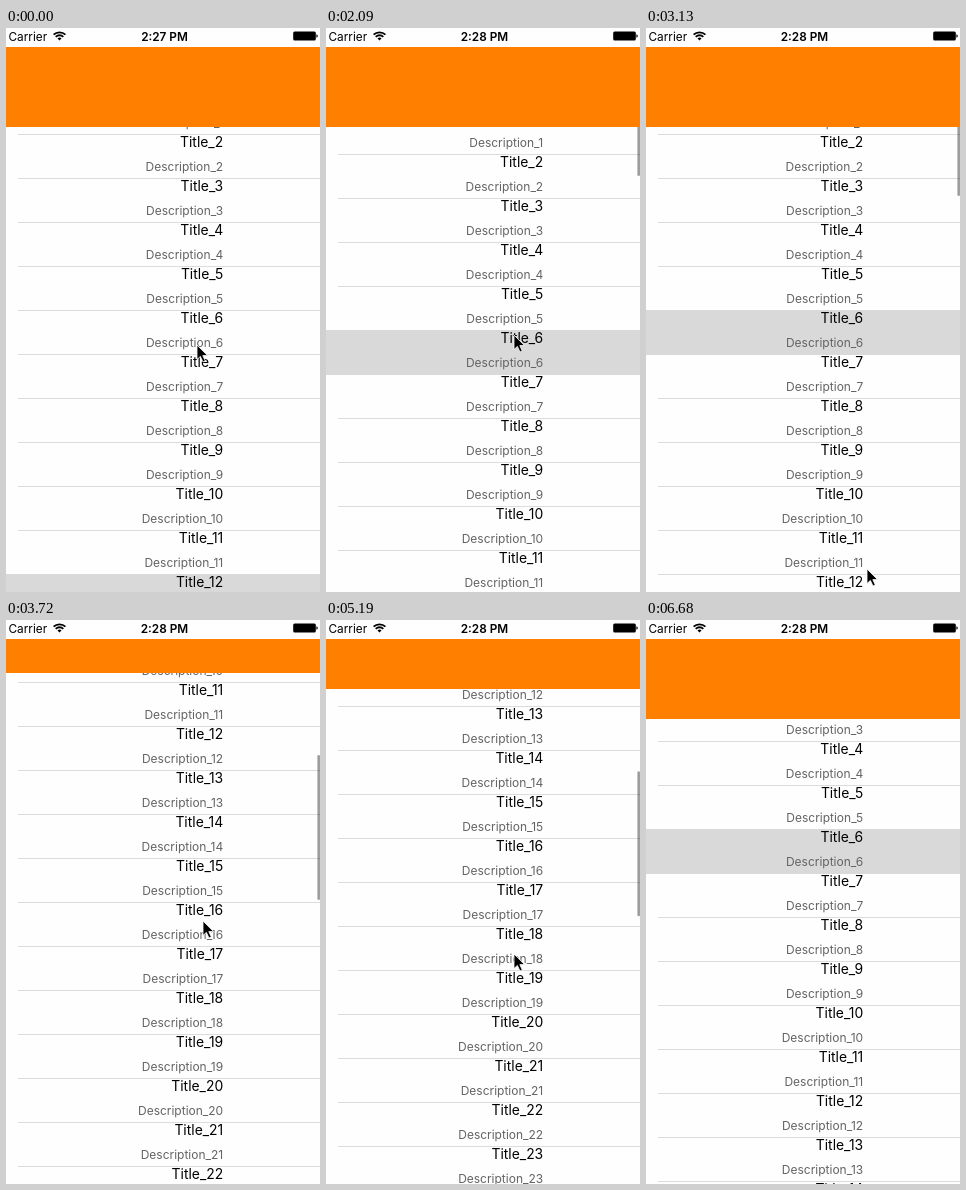
Write an HTML page that moves like this. It is 314 px wide and 564 px high and loops after 6820 ms.

```html
<!DOCTYPE html>
<html lang="en">
<head>
<meta charset="utf-8">
<title>List with collapsing header</title>
<style>
  html, body { margin: 0; width: 100%; height: 100%; overflow: hidden; background: #fff; }
  svg { display: block; width: 314px; height: 564px; font-family: Inter, Roboto, sans-serif; }
  .title { font-size: 13.9px; fill: #000; text-anchor: end; }
  .description { font-size: 12px; fill: #636363; text-anchor: end; }
  .status { font-size: 11.8px; }
</style>
</head>
<body>
<svg viewBox="0 0 314 564">
  <rect width="314" height="564" fill="#fefefe"/>
  <g id="rows"></g>
  <rect id="indicator" x="311.4" width="2.6" rx="1.3" fill="#000" opacity=".38"/>
  <rect width="314" height="21" fill="#fefefe"/>
  <rect id="header" y="19" width="314" fill="#ff8000"/>
  <g class="status">
    <text x="2.5" y="12.6">Carrier</text>
    <text id="clock" x="158.5" y="12.6" text-anchor="middle" font-weight="600"></text>
  </g>
  <g fill="none" stroke="#000" stroke-width="1.8">
    <path d="M47.6 6.7a8.4 8.4 0 0 1 11.8 0M49.7 8.8a5.4 5.4 0 0 1 7.6 0"/>
    <path d="M53.5 12.6l-2-2a2.8 2.8 0 0 1 4 0z" fill="#000" stroke="none"/>
  </g>
  <rect x="287.2" y="3.4" width="22.6" height="9.2" rx="1.5"/>
  <path d="M310.4 6.3q1.4.4 1.4 1.7t-1.4 1.7z"/>
  <path id="cursor" d="M0 0V14.5L3.4 11.4L6 17L8.3 16L5.8 10.6H10.5Z" stroke="#fff" stroke-width=".8"/>
</svg>
<script>
const LOOP = 6820, STEPS = 46, ROW = 44, REST = 18, FAR = -900;
const $ = id => document.getElementById(id);
const clamp = (v, lo, hi) => Math.min(hi, Math.max(lo, v));

const linear = u => u;
const easeIn = u => u * u;
const easeOut = u => 1 - (1 - u) ** 2;
const glide = u => 1 - (1 - u) ** 4;

// each move: start step, end step, destination, easing
const scrollMoves = [
  [21, 25, [-422], easeIn],
  [25, 29, [FAR], easeOut],
  [32, 35, [-486], easeIn],
  [35, 45, [-55], glide]
];
const cursorMoves = [
  [2, 4, [180, 354]],
  [4, 6, [168, 310]],
  [6, 8, [177, 249]],
  [9, 11, [177, 229]],
  [13, 17, [221, 541]],
  [21, 25, [197, 301]],
  [25, 28, [178, 122]],
  [32, 35, [188, 334]],
  [35, 40, [235, 550]]
];

function follow(origin, moves, k) {
  return moves.reduce((from, [start, end, to, ease = linear]) => {
    const u = ease(clamp((k - start) / (end - start), 0, 1));
    return from.map((v, i) => v + (to[i] - v) * u);
  }, origin);
}

function listTop(k) {
  // pulled past its top edge, then springing back
  const overscroll = 47 * Math.sin(Math.PI * clamp((k - 13) / 7, 0, 1));
  return Math.round(follow([REST], scrollMoves, k)[0] + overscroll);
}

function add(parent, tag, attributes = {}) {
  const node = document.createElementNS("http://www.w3.org/2000/svg", tag);
  set(node, attributes);
  return parent.appendChild(node);
}

function set(node, attributes) {
  for (const name in attributes) node.setAttribute(name, attributes[name]);
}

const rows = Array.from({ length: 14 }, () => {
  const group = add($("rows"), "g");
  return {
    group,
    line: add(group, "rect"),
    title: add(group, "text", { class: "title", x: 217.2, y: 13.4 }),
    description: add(group, "text", { class: "description", x: 217.2, y: 37.4 })
  };
});

function drawRows(top, selected) {
  const first = Math.max(0, Math.floor(-top / ROW));
  rows.forEach((row, i) => {
    const n = first + i;
    set(row.group, { transform: `translate(0 ${top + n * ROW})` });
    set(row.line, n === selected
      ? { x: 0, width: 314, height: ROW + 1, fill: "#d9d9d9" }
      : { x: 12, width: 302, height: n === selected + 1 ? 0 : 1, fill: "#dcdcde" });
    row.title.textContent = "Title_" + n;
    row.description.textContent = "Description_" + n;
  });
}

function draw(time) {
  const k = Math.floor(time / LOOP * STEPS), top = listTop(k);
  drawRows(top, k === 0 ? 12 : 6);

  // collapses on the way down, grows back on the way up
  const height = k < 30 ? 80 - 0.1045 * (REST - top) : 0.121 * (top - FAR);
  set($("header"), { height: Math.round(clamp(height, 0, 80)) });

  const scrolling = (k >= 14 && k <= 30) || (k >= 33 && k <= 43);
  set($("indicator"), {
    y: 23 + 0.2545 * Math.max(0, REST - top),
    height: 145 - Math.max(0, top - REST),
    visibility: scrolling ? "visible" : "hidden"
  });

  $("clock").textContent = k < 14 ? "2:27 PM" : "2:28 PM";
  const [x, y] = follow([191, 317], cursorMoves, k);
  set($("cursor"), {
    transform: `translate(${x} ${y})`,
    visibility: k > 40 ? "hidden" : "visible"
  });
}

const start = performance.now();
function tick() {
  draw((performance.now() - start) % LOOP);
  requestAnimationFrame(tick);
}
tick();
</script>
</body>
</html>
```
